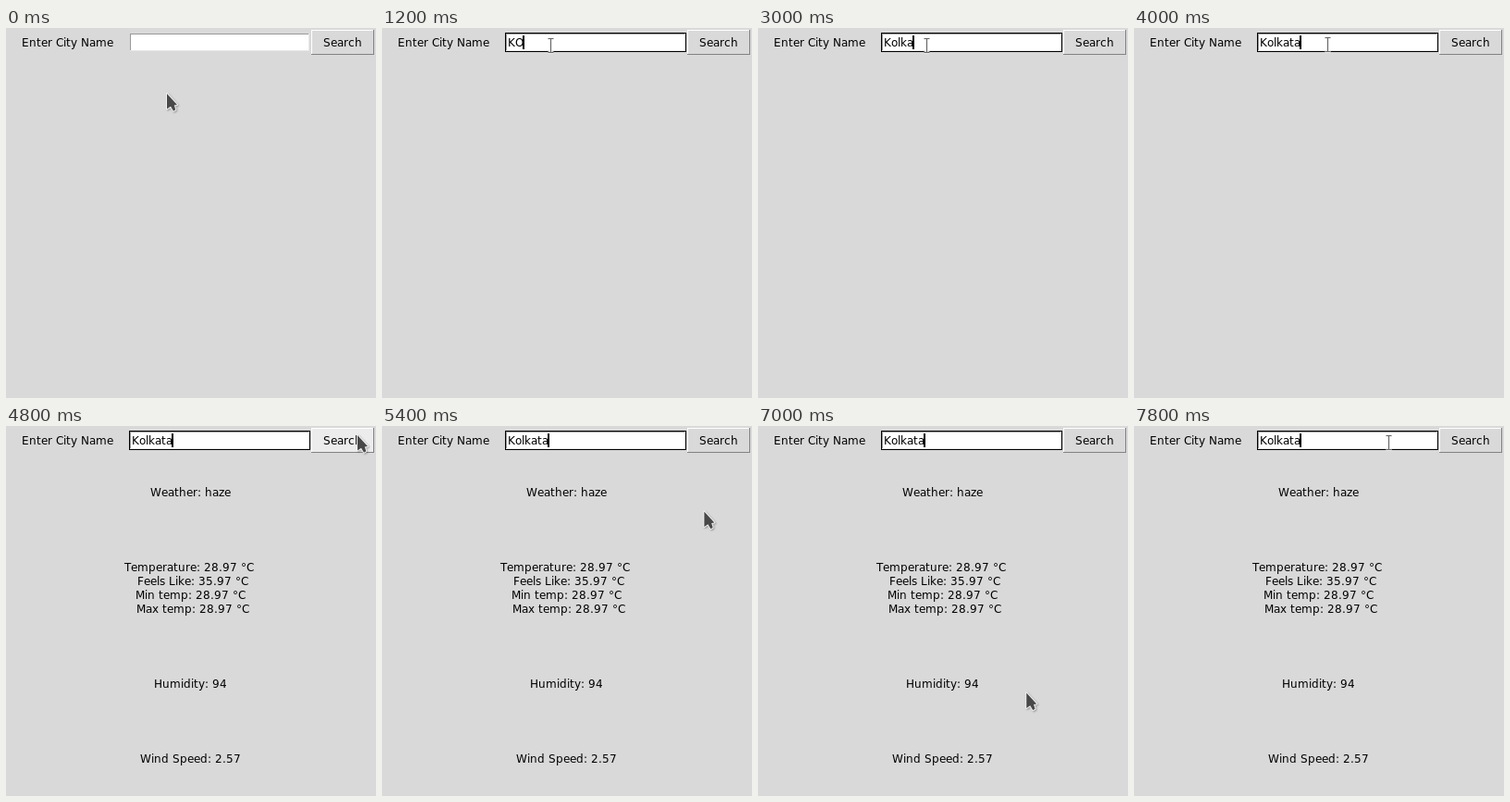
An HTML page with a canvas that plays this animation: 400 by 400 pixels, repeating every 8000 ms.

```html
<!DOCTYPE html>
<html lang="en">
<head>
<meta charset="utf-8">
<title>City weather</title>
<style>
  html, body { margin: 0; height: 100%; overflow: hidden; background: #d9d9d9; }
  canvas { display: block; }
</style>
</head>
<body>
<canvas id="stage" width="400" height="400"></canvas>
<script>
const ctx = document.getElementById('stage').getContext('2d');
const LOOP = 8000, STEP = 200;
const FACE = '#d9d9d9';
const FOCUS_TIME = 800, RETYPE_TIME = 2000, PRESS_TIME = 4600, RESULT_TIME = 4800;
const LINE_HEIGHT = 15, BLOCK_GAP = 81;

const results = [
  ['Weather: haze'],
  ['Temperature: 28.97 °C ', ' Feels Like: 35.97 °C', 'Min temp: 28.97 °C', ' Max temp: 28.97 °C'],
  ['Humidity: 94'],
  ['Wind Speed: 2.57']
];

// Resting points of the pointer: time, x, y
const path = [
  [0, 174, 71], [600, 182, 18], [3600, 182, 18], [4000, 209, 17], [4600, 380, 10],
  [5000, 380, 10], [6200, 258, 328], [6800, 292, 320], [7800, 275, 17]
];

const clamp = (v, low, high) => Math.min(high, Math.max(low, v));
const ease = k => k * k * (3 - 2 * k);

function pointerAt(t) {
  const next = path.findIndex(p => p[0] >= t);
  if (next <= 0) return path.at(next).slice(1);
  const [t0, x0, y0] = path[next - 1], [t1, x1, y1] = path[next];
  const k = ease((t - t0) / (t1 - t0));
  return [x0 + (x1 - x0) * k, y0 + (y1 - y0) * k];
}

// One key per step: a mistyped start is deleted to its first letter, then the word follows.
function typedAt(t) {
  if (t < RETYPE_TIME) return 'KOl'.slice(0, clamp(3 - Math.abs(t - 1400) / STEP, 0, 3));
  return 'Kolkata'.slice(0, clamp((t - RETYPE_TIME) / STEP, 1, 7));
}

function rect(color, x, y, w, h) {
  ctx.fillStyle = color;
  ctx.fillRect(x, y, w, h);
}

function bevel(x, y, w, h, fill, topLeft, bottomRight) {
  rect(bottomRight, x, y, w, h);
  rect(topLeft, x, y, w - 1, h - 1);
  rect(fill, x + 1, y + 1, w - 2, h - 2);
}

// Letters advance by whole pixels, as in a hinted desktop toolkit.
const advance = letter => Math.round(ctx.measureText(letter).width);
const textWidth = text => [...text].reduce((sum, letter) => sum + advance(letter), 0);

function label(text, x, y) {
  ctx.fillStyle = '#000';
  for (const letter of text) {
    ctx.fillText(letter, x, y);
    x += advance(letter);
  }
}

function drawResults() {
  let y = 76;
  for (const block of results) {
    block.forEach((text, i) => label(text, Math.floor(200 - textWidth(text) / 2), y + i * LINE_HEIGHT));
    y += BLOCK_GAP + (block.length - 1) * LINE_HEIGHT;
  }
}

function drawArrow(x, y) {
  ctx.save();
  ctx.translate(x, y);
  ctx.beginPath();
  [[0, 0], [0, 16.5], [4, 13.8], [7, 18.7], [9.3, 17.3], [7.8, 12.6], [11, 12]]
    .forEach(p => ctx.lineTo(...p));
  ctx.closePath();
  ctx.shadowColor = 'rgba(0,0,0,.3)';
  ctx.shadowBlur = 2;
  ctx.shadowOffsetX = ctx.shadowOffsetY = 1;
  ctx.strokeStyle = '#f4f4f4';
  ctx.lineWidth = 2;
  ctx.lineJoin = 'round';
  ctx.stroke();
  ctx.shadowColor = 'transparent';
  ctx.fillStyle = '#484848';
  ctx.fill();
  ctx.restore();
}

function drawBeam(x, y) {
  const cx = Math.floor(x) + 0.5, top = Math.floor(y) - 6.5, bottom = top + 15;
  ctx.beginPath();
  for (const edge of [top, bottom]) {
    ctx.moveTo(cx - 3, edge);
    ctx.lineTo(cx + 3, edge);
  }
  ctx.moveTo(cx, top);
  ctx.lineTo(cx, bottom);
  for (const [color, width] of [['#eee', 2.5], ['#666', 1]]) {
    ctx.strokeStyle = color;
    ctx.lineWidth = width;
    ctx.stroke();
  }
}

function draw(t) {
  const [x, y] = pointerAt(t);
  const overEntry = x > 133 && x < 329 && y > 5 && y < 26;
  const overButton = x > 330 && y < 29;
  const focused = t >= FOCUS_TIME;

  ctx.font = '12px "DejaVu Sans", sans-serif';
  rect(FACE, 0, 0, 400, 400);
  label('Enter City Name', 17, 20);

  rect(focused ? '#000' : FACE, 133, 5, 196, 21);
  bevel(134, 6, 194, 19, '#fff', '#999', '#e6e6e6');
  const text = typedAt(t);
  label(text, 136, 20);
  const caretOn = (t + 600) % 900 <= 600;
  if (focused && caretOn) rect('#000', 135 + textWidth(text), 8, 2, 15);

  const edges = ['#fff', '#828282'];
  if (t === PRESS_TIME) edges.reverse();
  bevel(330, 2, 68, 27, overButton ? '#ececec' : FACE, ...edges);
  label('Search', 343, 20);

  if (t >= RESULT_TIME) drawResults();
  (overEntry ? drawBeam : drawArrow)(x, y);
}

const start = performance.now();
function tick() {
  const elapsed = (performance.now() - start) % LOOP;
  draw(Math.floor(elapsed / STEP) * STEP);
  requestAnimationFrame(tick);
}
tick();
</script>
</body>
</html>
```
